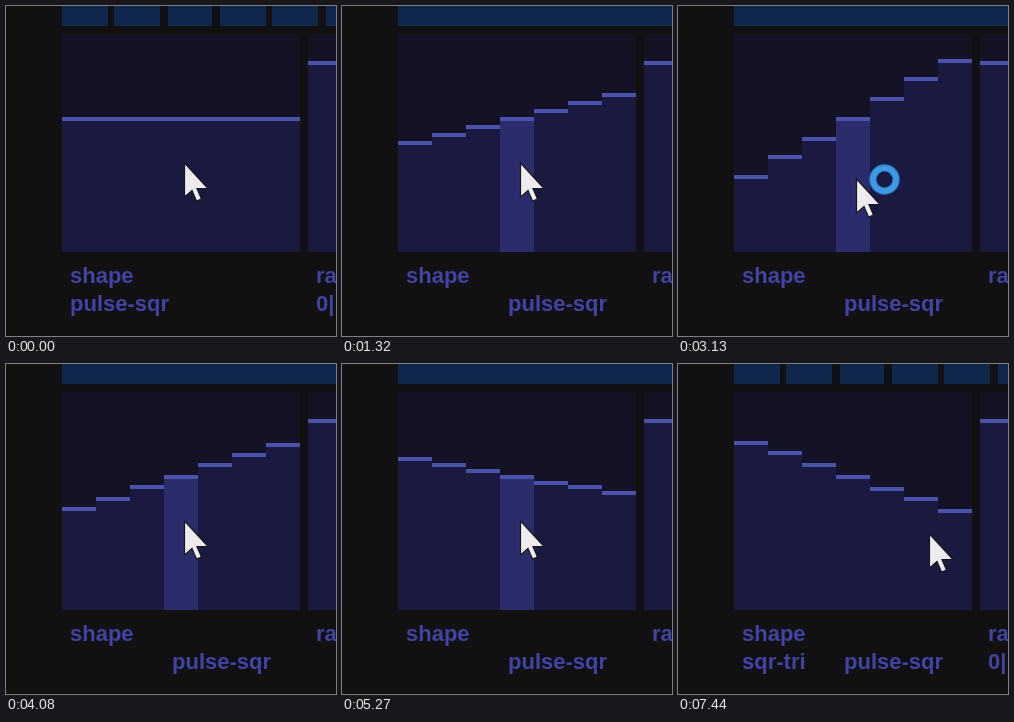
Animation of 330 by 330 pixels, one loop 7.51 s. Source, as an HTML page:

```html
<!DOCTYPE html>
<html lang="en">
<head>
<meta charset="utf-8">
<title>Sequencer lane drag</title>
<style>
  html, body { margin: 0; width: 100%; height: 100%; overflow: hidden; background: #111; }
  svg { display: block; width: 100vw; height: 100vh; }
  rect { shape-rendering: crispEdges; }
  text { font: bold 22px "Liberation Sans", Arial, sans-serif; fill: #4243a6; }
  .cell { fill: #11284e; }
  .panel { fill: #131325; }
  .fill { fill: #1a1a40; }
  .active { fill: #2a2c6b; }
  .line { fill: #4b52ad; }
</style>
</head>
<body>
<svg id="stage" viewBox="0 0 330 330">
  <rect width="330" height="330" fill="#111"/>
</svg>
<script>
const LOOP = 7510, PRESS = 70, RELEASE = 6950;
const BUSY = [2950, 3400];
const LEFT = 56, COL = 34, COUNT = 7, MID = 3, BOTTOM = 246, CENTER = 113, STEP = 2;

// [time, slope in steps per column]
const slopeKeys = [
  [700, 0], [1320, 4], [1460, 4.4], [1670, 5.73], [1740, 5.73], [2510, 9],
  [2650, 9.73], [3380, 9.73], [4080, 5.4], [4150, 4.75], [4850, 0.13], [5690, -5.73]
];

const stage = document.getElementById('stage');

function add(tag, attrs, parent = stage) {
  const el = document.createElementNS('http://www.w3.org/2000/svg', tag);
  for (const key in attrs) el.setAttribute(key, attrs[key]);
  return parent.appendChild(el);
}
const rect = (cls, x, y, width, height, parent) =>
  add('rect', { class: cls, x, y, width, height }, parent);
function label(str, x, y) {
  const el = add('text', { x, y });
  el.textContent = str;
  return el;
}
const show = (el, on) => el.setAttribute('visibility', on ? 'visible' : 'hidden');

// Upper strip
const cells = add('g', {});
[[56, 46], [108, 46], [162, 44], [214, 46], [266, 46], [320, 10]]
  .forEach(([x, w]) => rect('cell', x, 0, w, 20, cells));
const strip = rect('cell', LEFT, 0, 274, 20);

// Lanes
rect('panel', LEFT, 28, COL * COUNT, BOTTOM - 28);
rect('panel', 302, 28, 28, BOTTOM - 28);
rect('fill', 302, 57, 28, BOTTOM - 57);
rect('line', 302, 55, 28, 4);

const columns = Array.from({ length: COUNT }, (_, i) => {
  const x = LEFT + i * COL;
  return { fill: rect('fill', x, 0, COL, 0), line: rect('line', x, 0, COL, 4) };
});

// Labels
label('shape', 64, 277);
label('ra', 310, 277);
const pulse = label('pulse-sqr', 64, 305);
const tri = label('sqr-tri', 64, 305);
const range = label('0|', 310, 305);

// Pointer
const pointer = add('g', {});
add('path', {
  d: 'M.5 0V34L8 27.5L12.5 38L17.5 36L13 25.5H24Z',
  fill: '#ececec', stroke: '#16161c', 'stroke-width': 1.2
}, pointer);
const ring = add('g', {}, pointer);
add('circle', { cx: 28.5, cy: 0.5, r: 11.6, fill: 'none', stroke: '#2878c4', 'stroke-width': 7.4 }, ring);
add('circle', { cx: 28.5, cy: 0.5, r: 11.6, fill: 'none', stroke: '#3c9ae6', 'stroke-width': 5.2 }, ring);

function sample(keys, t) {
  if (t <= keys[0][0]) return keys[0][1];
  for (let i = 1; i < keys.length; i++) {
    const [t0, v0] = keys[i - 1], [t1, v1] = keys[i];
    if (t < t1) return v0 + (v1 - v0) * (t - t0) / (t1 - t0);
  }
  return keys[keys.length - 1][1];
}

function render(t) {
  const dragging = t >= PRESS && t < RELEASE;
  const slope = sample(slopeKeys, t);

  columns.forEach(({ fill, line }, i) => {
    const y = CENTER + STEP * Math.floor((MID - i) * slope + 0.3);
    fill.setAttribute('y', y);
    fill.setAttribute('height', BOTTOM - y);
    fill.setAttribute('class', dragging && i === MID ? 'active' : 'fill');
    line.setAttribute('y', y - 2);
  });

  show(cells, !dragging);
  show(strip, dragging);
  show(range, !dragging);
  show(tri, t >= RELEASE);
  pulse.setAttribute('x', t < PRESS ? 64 : 64 + MID * COL);

  const busy = t >= BUSY[0] && t < BUSY[1];
  show(ring, busy);
  const p = Math.min(1, Math.max(0, (t - RELEASE) / 490));
  const move = p * p * (3 - 2 * p);
  const x = 178 + 73 * move, y = 157 + 13 * move + (busy ? 16 : 0);
  pointer.setAttribute('transform', `translate(${x} ${y})`);
}

const start = performance.now();
function tick() {
  render((performance.now() - start) % LOOP);
  requestAnimationFrame(tick);
}
tick();
</script>
</body>
</html>
```
